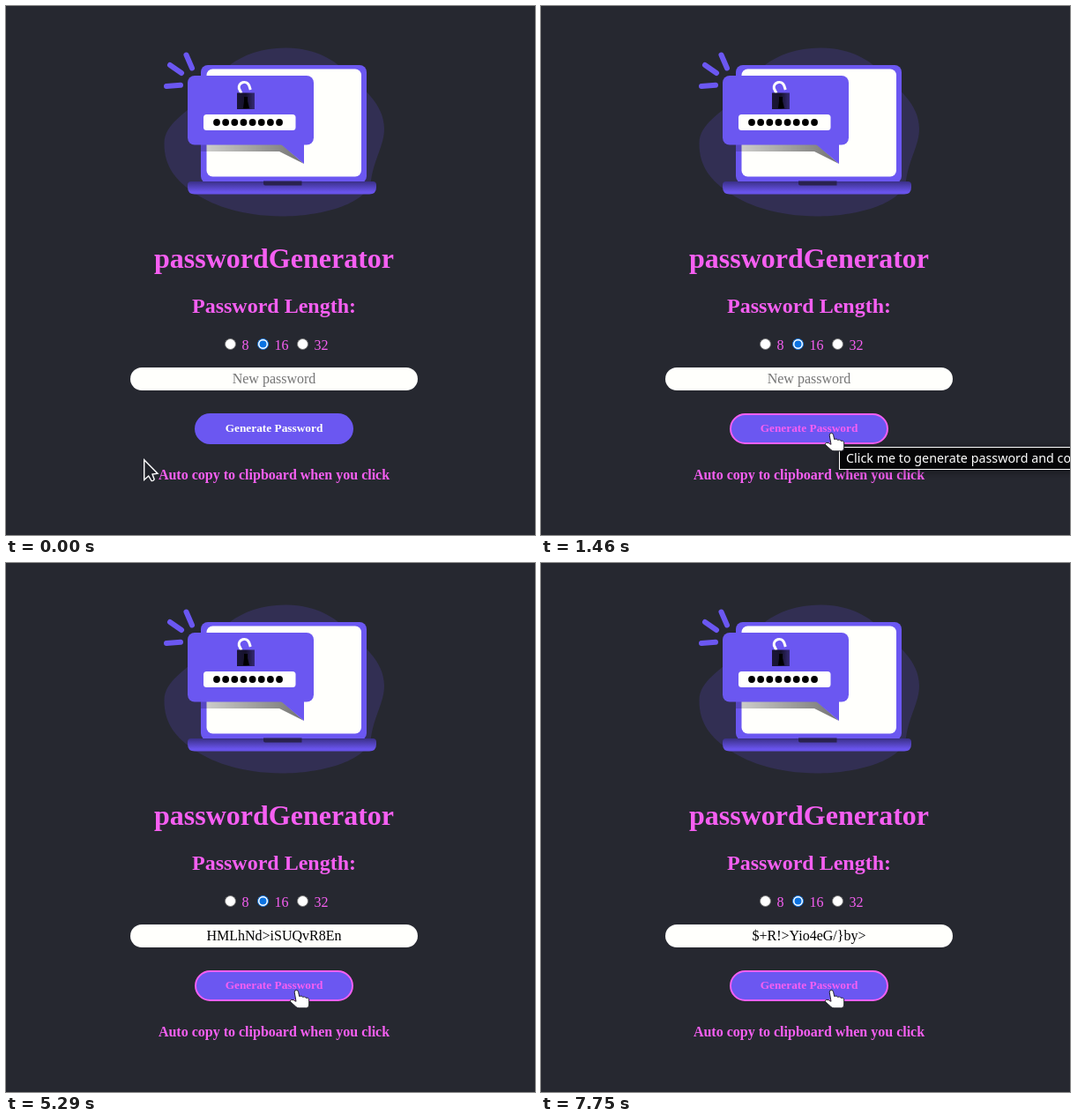
An HTML page for the animation above (8000 ms loop, 600 px wide and 600 px high).

```html
<!DOCTYPE html>
<html lang="en">
<head>
<meta charset="utf-8">
<title>Password generator</title>
<style>
  html, body { margin: 0; width: 100%; height: 100%; overflow: hidden; background: #262830; }
  svg { display: block; width: 100vw; height: 100vh; }
  text { font-family: "Liberation Serif", "Times New Roman", serif; font-size: 16px; white-space: pre; }
  .pink { fill: #f65ff2; }
  .bold { font-weight: bold; }
  .mid { text-anchor: middle; }
  .purple { fill: #6b57f1; }
  .white { fill: #fffffc; }
  #tip text { font: 14.3px "Noto Sans", "Open Sans", sans-serif; fill: #fff; }
</style>
</head>
<body>
<svg viewBox="0 0 600 600" xmlns="http://www.w3.org/2000/svg">
  <defs>
    <linearGradient id="base" x2="0" y2="1">
      <stop offset="0" stop-color="#3a3087"/><stop offset=".8" stop-color="#6853ea"/>
    </linearGradient>
    <linearGradient id="shade">
      <stop offset="0" stop-color="#000" stop-opacity=".18"/><stop offset="1" stop-color="#000" stop-opacity=".55"/>
    </linearGradient>
    <linearGradient id="body">
      <stop offset="0" stop-color="#1b1638"/><stop offset=".5" stop-color="#16122c"/><stop offset="1" stop-color="#352a75"/>
    </linearGradient>
    <filter id="soft" filterUnits="userSpaceOnUse" x="310" y="480" width="320" height="70">
      <feGaussianBlur stdDeviation="5"/>
    </filter>
  </defs>
  <rect width="600" height="600" fill="#262830"/>

  <!-- illustration -->
  <path fill="#322f53" d="M318 47.500C352 48 374 62 388 77C402 92 429 110 429 139C429 158 418 172 414 198C409 226 355 238.500 313 238.500C270 238 238 228 215 213C192 198 179 181 179.500 155C180 134 204 122 214 110C232 88 256 47 318 47.500Z"/>
  <path stroke="#6b57f1" stroke-width="6" stroke-linecap="round" d="M204.500 55.500L211 70.500M186 67L199 76M182 91L198 89.700"/>
  <rect class="purple" x="221" y="67" width="188" height="134" rx="8"/>
  <rect class="white" x="227.500" y="71.500" width="175.500" height="122" rx="7"/>
  <path fill="url(#base)" d="M206 203q0-4 4-4H416q4 0 4 4v2.500q0 8-8 8H214q-8 0-8-8Z"/>
  <path fill="#29224f" d="M292 198.500H335.500V203.500H294q-2 0-2-2Z"/>
  <path fill="url(#shade)" d="M221 157H313L338 179L310 165H221Z"/>
  <rect class="purple" x="206" y="79" width="143" height="78.500" rx="8"/>
  <path class="purple" d="M312 157H338V179Z"/>
  <path fill="none" stroke="#fffffc" stroke-width="3" d="M267 99L264.300 93.500A6 6 0 0 1 275.600 89.800L277.300 95"/>
  <rect x="262" y="98.500" width="20" height="18.500" fill="url(#body)"/>
  <path fill="#000" d="M270 103h4v5l2 8h-7l1-8Z"/>
  <rect class="white" x="224" y="123" width="104.500" height="18" rx="3.500"/>
  <g id="dots"></g>

  <!-- form -->
  <text class="pink bold mid" x="304" y="297" style="font-size:32px">passwordGenerator</text>
  <text class="pink bold mid" x="304" y="348" style="font-size:24px">Password Length:</text>
  <g id="radios"></g>
  <rect class="white" x="141" y="410" width="326" height="26" rx="13"/>
  <text id="field" class="mid" x="304" y="428"></text>
  <rect id="button" class="purple"/>
  <text id="label" class="bold mid" x="304" y="483" style="font-size:13.333px">Generate Password</text>
  <text class="pink bold mid" x="304" y="537">Auto copy to clipboard when you click</text>

  <g id="tip">
    <rect x="338" y="502" width="290" height="26" filter="url(#soft)" opacity=".45"/>
    <rect x="338.500" y="500.500" width="290" height="25" fill="#050507" stroke="#fff"/>
    <text x="346" y="518">Click me to generate password and copy</text>
  </g>

  <path id="arrow" fill="#202229" stroke="#fff" stroke-width="1.400" d="M.7 1.700V24.500L5.700 20L9 25.500Q11 26 12.200 24L10 18L16 17.200Z"/>
  <path id="hand" fill="#fff" stroke="#23242c" stroke-width="1" stroke-linejoin="round" d="M-2.800 1.800Q-2.800-.6-.6-.6Q1.200-.6 1.600 1.500L2.700 6.500Q5.500 5 6.500 7.300Q9 6 10 8.300Q13.500 7.500 13.700 11V16Q13.700 19.800 10.500 19.800H2Q0 19.800-1.500 18L-7.300 12.800Q-8.300 10.800-6.300 10.300Q-4 10-1 12.300Z"/>
</svg>
<script>
const LOOP = 8000;
const HOVER_FROM = 640;
const TIP_FROM = 1460, TIP_TO = 3750;
const $ = id => document.getElementById(id);

const entries = [
  [0, "New password"],
  [3880, "k7T$pNe4!dR2#vLa"],
  [4710, "Qm3>xUe5[hG8z*Tf"],
  [5290, "HMLhNd>iSUQvR8En"],
  [6000, "w4#Jt9pR}sK6a+Vi"],
  [6460, "B/v/cWz]6s5*{#d@"],
  [7330, "Dn2/gC8!uXo5{Mst"],
  [7750, "$+R!>Yio4eG/}by>"]
];

$("dots").innerHTML = Array.from({ length: 8 }, (_, i) =>
  `<circle cx="${239 + i * 10.15}" cy="132" r="3.9"/>`).join("");

const radio = (x, label, checked) =>
  `<circle cx="${x}" cy="383.500" r="6" fill="#fff" stroke="${checked ? "#0b72e0" : "#767676"}"/>` +
  (checked ? `<circle cx="${x}" cy="383.500" r="4" fill="#0b72e0"/>` : "") +
  `<text class="pink" x="${x + 13}" y="390">${label}</text>`;
$("radios").innerHTML = radio(254.5, 8) + radio(291.5, 16, true) + radio(336.5, 32);

function setAttrs(el, attrs) {
  for (const key in attrs) el.setAttribute(key, attrs[key]);
}
const show = (id, on) => $(id).style.display = on ? "" : "none";

// The pointer moves in discrete steps.
function pointerAt(t) {
  if (t < 80) return [156, 513];
  if (t < 210) return [174, 513];
  if (t < 420) return [161, 513];
  const p = Math.min(1, (Math.floor((t - 420) / 74) + 1) / 6);
  const k = p * p * (3 - 2 * p);
  return [161 + 169 * k, 513 - 28 * k];
}

function render(t) {
  const hover = t >= HOVER_FROM;
  const place = `translate(${pointerAt(t).join(" ")})`;
  show("arrow", !hover);
  show("hand", hover);
  $("arrow").setAttribute("transform", place);
  $("hand").setAttribute("transform", place);

  const inset = hover ? 1 : 0;
  setAttrs($("button"), {
    x: 214 + inset, y: 462 + inset, width: 180 - 2 * inset, height: 35 - 2 * inset,
    rx: 17.5 - inset, stroke: hover ? "#f65ff2" : "none", "stroke-width": 2
  });
  $("label").setAttribute("fill", hover ? "#f65ff2" : "#fffffc");

  const [since, value] = entries.filter(e => e[0] <= t).pop();
  $("field").textContent = value;
  $("field").setAttribute("fill", since ? "#000" : "#757575");
  show("tip", t >= TIP_FROM && t < TIP_TO);
}

function tick() {
  render(performance.now() % LOOP);
  requestAnimationFrame(tick);
}
tick();
</script>
</body>
</html>
```
